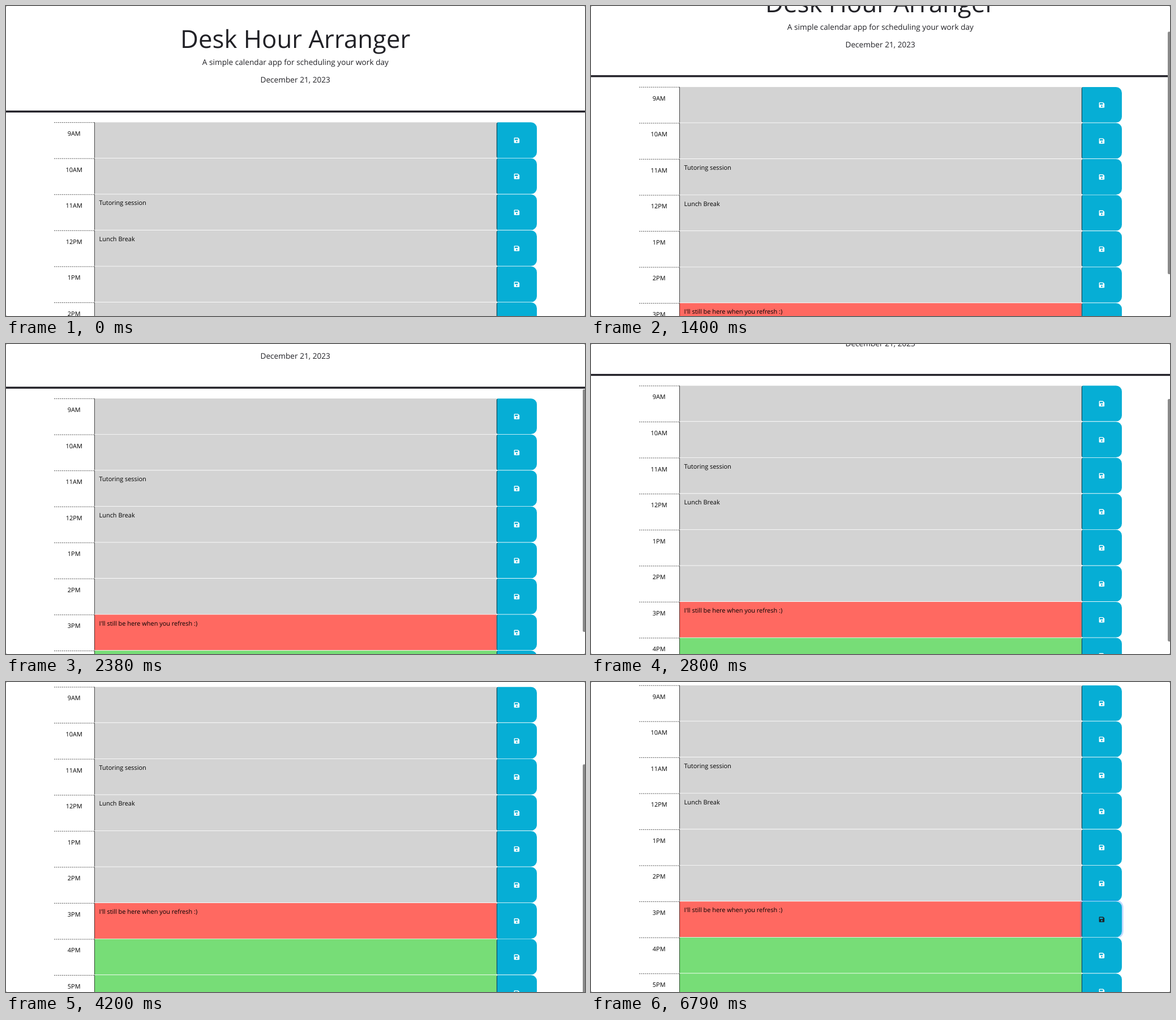
Recreate the animation shown at these times as an HTML page. Size 1023 by 547 pixels, loop 8 s.

```html
<!DOCTYPE html>
<html lang="en">
<head>
<meta charset="utf-8">
<title>Day planner</title>
<style>
  html, body { margin: 0; width: 100%; height: 100%; overflow: hidden; background: #fff; }
  svg { display: block; width: 100%; height: 100%; }
  text { font-family: "Open Sans", sans-serif; font-size: 10.93px; text-rendering: geometricPrecision; }
  .head text { fill: #212126; text-anchor: middle; font-size: 13.67px; }
  .head .title { font-size: 43.74px; }
  .hour { text-anchor: middle; }
</style>
</head>
<body>
<svg viewBox="0 0 1023 547" preserveAspectRatio="none">
  <rect width="1023" height="547" fill="#fff"/>
  <g id="page">
    <g class="head">
      <text class="title" x="511.3" y="73.5">Desk Hour Arranger</text>
      <text x="511.4" y="104">A simple calendar app for scheduling your work day</text>
      <text x="511.2" y="135.4">December 21, 2023</text>
      <rect y="184.5" width="1023" height="3.4" fill="#201f26"/>
    </g>
    <g id="rows"></g>
  </g>
  <rect id="bar" x="1019" width="5" height="428" rx="2.3" fill="#8a8a8a"/>
  <path d="M0 0h2.5Q0 0 0 2.5zM1023 0v2.5Q1023 0 1020.5 0zM0 547v-2.5Q0 547 2.5 547zM1023 547h-2.5Q1023 547 1023 544.5z" fill="#999"/>
</svg>
<script>
const LOOP = 8000, STEP = 70;
const TOP = 205.3, PITCH = 63.56, HEIGHT = 62.88, LINE = 0.68;
const LEFT = 85.1, COL = 71.07, RIGHT = LEFT + 12 * COL;
const DESC_X = LEFT + COL, BTN_X = RIGHT - COL, RING = 2.73;
const COLORS = { past: '#d3d3d3', present: '#ff6961', future: '#77dd77' };
const NOTES = { 2: 'Tutoring session', 3: 'Lunch Break', 6: "I'll still be here when you refresh :)" };
const ACTIVE = 6;
const FLOPPY = 'M1.5 0h8.4q.6 0 1.05.45l2.6 2.6q.45.45.45 1.05v8.4q0 1.5-1.5 1.5h-11q-1.5 0-1.5-1.5v-11q0-1.5 1.5-1.5z' +
  'M2.4 2q-.4 0-.4.4v3.2q0 .4.4.4h7.2q.4 0 .4-.4v-3.2q0-.4-.4-.4zM7 8a2 2 0 1 0 .01 0z';

// Box with separate radii for its left and right corners
function box(x, y, w, h, l, r) {
  return `M${x + l} ${y}h${w - l - r}a${r} ${r} 0 0 1 ${r} ${r}v${h - 2 * r}a${r} ${r} 0 0 1 ${-r} ${r}` +
    `h${l + r - w}a${l} ${l} 0 0 1 ${-l} ${-l}v${2 * l - h}a${l} ${l} 0 0 1 ${l} ${-l}z`;
}

function row(i) {
  const hour = 9 + i;
  const label = (hour > 12 ? hour - 12 : hour) + (hour < 12 ? 'AM' : 'PM');
  const state = i < ACTIVE ? 'past' : i === ACTIVE ? 'present' : 'future';
  const active = i === ACTIVE;
  const ring = active
    ? `<path id="ring" d="${box(BTN_X - RING, -RING, COL + 2 * RING, HEIGHT + 2 * RING, 2.73 + RING, 10.25 + RING)}" fill="#0d6efd"/>
       <path d="${box(BTN_X, 0, COL, HEIGHT, 2.73, 10.25)}" fill="#fff"/>` : '';
  return `<g transform="translate(0 ${TOP + i * PITCH})">
    <rect x="${LEFT}" y="${-LINE}" width="${12 * COL}" height="${LINE}" fill="#fff"/>
    <path d="M${LEFT} .34H${DESC_X}" stroke="#000" stroke-width="${LINE}" stroke-dasharray="2.05 1.4"/>
    <text class="hour" x="120.2" y="23.8">${label}</text>
    <rect x="${DESC_X}" width="${10 * COL}" height="${HEIGHT}" fill="${COLORS[state]}"/>
    <rect x="${DESC_X}" width="${LINE}" height="${HEIGHT}"/>
    <text x="164.6" y="19">${NOTES[i] || ''}</text>
    <rect x="${BTN_X}" width="${COL}" height="${HEIGHT}" fill="#fff"/>
    ${ring}
    <path d="${box(BTN_X, 0, COL, HEIGHT, 2.73, 10.25)}" fill="#06aed5"/>
    <path d="M${BTN_X + 1.3} .6Q${BTN_X + 0.4} 1.4 ${BTN_X + 0.4} 2.8V${HEIGHT - 2.8}q0 1.4 .9 2.2" fill="none" stroke="#000" stroke-width=".75"/>
    <path ${active ? 'id="icon"' : ''} transform="translate(897.6 27) scale(.683)" d="${FLOPPY}" fill="#fff" fill-rule="evenodd"/>
  </g>`;
}

const $ = id => document.getElementById(id);
$('rows').innerHTML = Array.from({ length: 9 }, (_, i) => row(i)).join('');

const ramp = (t, from, to) => Math.min(1, Math.max(0, (t - from) / (to - from)));
const swipe = u => 1 - Math.pow(1 - Math.pow(u, 1.3), 2.3);

// Each scroll gesture: start, end, distance
const GESTURES = [
  [560, 1400, 62.4], [1820, 2660, 53.6], [2660, 3290, 53], [3850, 4340, 30.4],
  [4480, 4550, 0.5], [4760, 5040, 0.8], [5110, 5180, 0.3], [5180, 5250, -0.8], [5320, 5390, -0.8]
];

function render(time) {
  const t = Math.floor(time / STEP + 1e-6) * STEP;
  const scroll = GESTURES.reduce((sum, [a, b, d]) => sum + d * swipe(ramp(t, a, b)), 0);
  $('page').setAttribute('transform', `translate(0 ${-scroll})`);
  $('bar').setAttribute('y', scroll * 0.745 - 1.2);
  $('bar').setAttribute('opacity', t < 630 ? 0 : 1 - ramp(t, 4760, 5040));

  const hover = ramp(t, 5810, 6020);
  const mix = [33, 37, 41].map(c => Math.round(255 + (c - 255) * hover));
  $('icon').setAttribute('fill', `rgb(${mix})`);
  $('ring').setAttribute('opacity', 0.25 * ramp(t, 6580, 6790));
}

const start = performance.now();
function tick() {
  render((performance.now() - start) % LOOP);
  requestAnimationFrame(tick);
}
tick();
</script>
</body>
</html>
```
